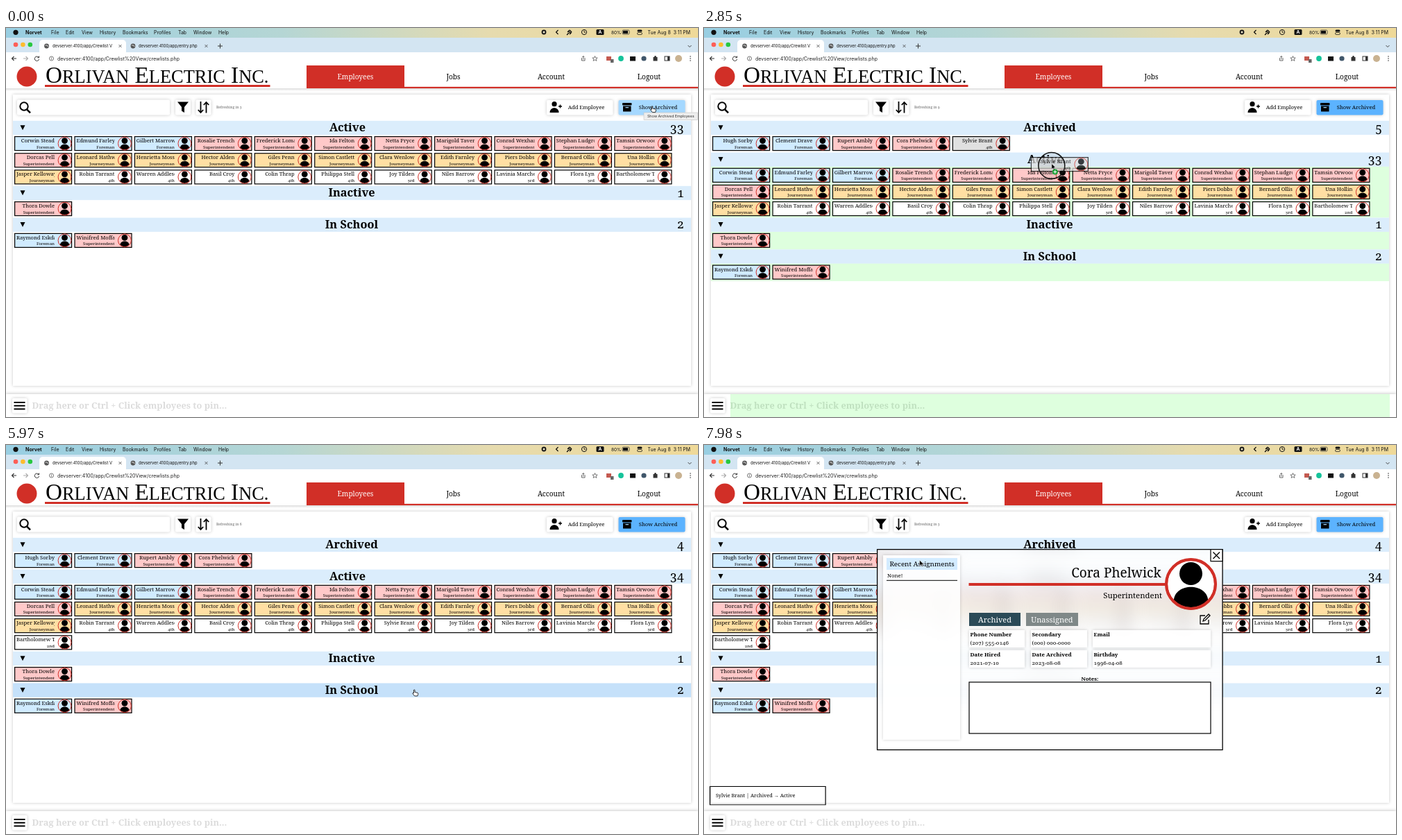
These frames come from a looping animation (997x561 px, 8 s). An HTML page:

```html
<!DOCTYPE html>
<html lang="en">
<head>
<meta charset="utf-8">
<title>Employees</title>
<style>
html, body { margin: 0; width: 100%; height: 100%; overflow: hidden; background: #fff; }
#stage { display: block; width: 100vw; height: 100vh; font-family: "Noto Serif", serif; font-variant-numeric: oldstyle-nums; }
.ui { font-family: Inter, "Open Sans", sans-serif; font-variant-numeric: lining-nums; }
.b { font-weight: 700; }
.m { text-anchor: middle; }
.e { text-anchor: end; }
.soft { filter: drop-shadow(0 0 2px rgba(0,0,0,.22)); }
</style>
</head>
<body>
<svg id="stage" viewBox="0 0 997 561" preserveAspectRatio="none"></svg>
<script>
const LOOP = 8000, RED = '#d12f27';
const stage = document.getElementById('stage');
const $ = id => document.getElementById(id);

// Markup helpers
const rect = (x, y, w, h, fill, more = '') => `<rect x="${x}" y="${y}" width="${w}" height="${h}" fill="${fill}" ${more}/>`;
const circle = (x, y, r, fill, more = '') => `<circle cx="${x}" cy="${y}" r="${r}" fill="${fill}" ${more}/>`;
const path = (d, fill, more = '') => `<path d="${d}" fill="${fill}" ${more}/>`;
const line = (d, w = 1, color = '#000') => path(d, 'none', `stroke="${color}" stroke-width="${w}"`);
const text = (x, y, size, str, cls = '', fill = '#000', more = '') =>
  `<text x="${x}" y="${y}" font-size="${size}" class="${cls}" fill="${fill}" ${more}>${str}</text>`;
const border = 'stroke="#000" stroke-width="1.2"';

// People, grouped by rank
const looks = {
  Foreman: ['#d0ebff', '#a5d8ff'],
  Superintendent: ['#ffc9c9', '#ffa8a8'],
  Journeyman: ['#ffdfa3', '#ffca75']
};
const plain = ['#fff', '#e0e0e0'];
const crew = (rank, names) => names.split(',').map(name => ({ name, rank }));
const mover = { name: 'Sylvie Brant', rank: '4th' };
const archived = [
  ...crew('Foreman', 'Hugh Sorby,Clement Drave'),
  ...crew('Superintendent', 'Rupert Ambly,Cora Phelwick')
];
const seniors = [
  ...crew('Foreman', 'Corwin Stead,Edmund Farley,Gilbert Marrow'),
  ...crew('Superintendent', 'Rosalie Trench,Frederick Lomas,Ida Felton,Netta Pryce,Marigold Tavering,Conrad Wexham,Stephan Ludgrove,Tamsin Orwood,Dorcas Pell'),
  ...crew('Journeyman', 'Leonard Hathwell,Henrietta Moss,Hector Alden,Giles Penn,Simon Castlett,Clara Wenlow,Edith Farnley,Piers Dobbs,Bernard Ollis,Una Hollin,Jasper Kelloway'),
  ...crew('4th', 'Robin Tarrant,Warren Addlesey,Basil Croy,Colin Thrap,Philippa Stell')
];
const juniors = [
  ...crew('3rd', 'Joy Tilden,Niles Barrow,Lavinia Marchend,Flora Lyn'),
  ...crew('2nd', 'Bartholomew Tandy')
];
const rest = [
  ['Inactive', crew('Superintendent', 'Thora Dowle')],
  ['In School', [...crew('Foreman', 'Raymond Eskdale'), ...crew('Superintendent', 'Winifred Moffat')]]
];
const active = ['Active', [...seniors, ...juniors]];
const scenes = [
  [active, ...rest],
  [['Archived', [...archived, mover]], active, ...rest],
  [['Archived', archived], ['Active', [...seniors, mover, ...juniors]], ...rest]
];

const pen = document.createElement('canvas').getContext('2d');
pen.font = '7.6px "Noto Serif", serif';

const avatar = (x, y, s) => `<g transform="translate(${x} ${y}) scale(${s})">
  ${circle(0, -4, 4.4, '#000')}${path('M-6.6 6.4C-6.2 -.6 6.2 -.6 6.6 6.4Q0 11.6 -6.6 6.4Z', '#000')}
  ${circle(0, 0, 9.4, 'none', `stroke="${RED}" stroke-width="1"`)}</g>`;

function card(x, y, { name, rank }, held) {
  const [base, over] = looks[rank] || plain;
  const long = pen.measureText(name).width > 55;
  return rect(x + .6, y + .6, 82, 20, held ? over : base, `${border} data-base="${base}" data-over="${over}" data-name="${name}"`) +
    `<svg x="${x + 3}" y="${y}" width="55" height="21" overflow="hidden">
    ${text(long ? 0 : 55, 9.2, 7.6, name, long ? '' : 'e')}${text(55, 17.6, 6.1, rank, 'e')}</svg>` +
    avatar(x + 72.5, y + 10.6, 1);
}

function scene(sections, index) {
  let y = 133.8, out = '';
  for (const [title, people] of sections) {
    const height = 21.6 + 24.15 * Math.ceil(people.length / 11);
    const mid = 498 - (people.length > 9 ? 6 : 0);
    if (title !== 'Archived') out += rect(10, y + 20, 977, height - 20, '#0f0', 'class="zone" opacity="0"');
    out += rect(10, y, 977, 20.3, '#dbedfc', 'data-base="#dbedfc" data-over="#c5e1fa"') +
      path(`M20.5 ${y + 6.5}h7l-3.5 7z`, '#000') +
      text(mid, y + 15.6, 16.3, title, 'b m') +
      text(977, y + 15.8, 17.5, people.length, 'e', '#000', 'font-weight="500"');
    people.forEach((p, i) => {
      out += card(12 + 86.43 * (i % 11), y + 22.2 + 24.15 * Math.floor(i / 11), p);
    });
    y += height;
  }
  return `<g id="scene${index}">${out}</g>`;
}

function browser() {
  const menus = [['File', 65], ['Edit', 86], ['View', 109], ['History', 135], ['Bookmarks', 168],
    ['Profiles', 213], ['Tab', 248], ['Window', 270], ['Help', 306]];
  const ui = (x, y, s, str, cls = '', fill = '#111') => text(x, y, s, str, 'ui ' + cls, fill);
  const globe = x => circle(x, 26, 3.4, '#555') + line(`M${x - 2} 25h3l1 2`, 1, '#ddd');
  const cross = x => line(`M${x - 2} 24l4 4m0-4l-4 4`, .8, '#444');
  return rect(0, 0, 997, 14, 'url(#sky)') + circle(14, 6.3, 3.6, '#111') +
    ui(28, 8.8, 7.1, 'Norvet', 'b') + menus.map(([s, x]) => ui(x, 8.8, 6.9, s)).join('') +
    circle(775, 6, 3.4, '#111') + rect(773.6, 4.6, 2.8, 2.8, '#e8e2c4') +
    line('M795.5 3l-3 3 3 3', 1.1) + line('M808 10l3-3m-1-3l4 4m-2-5l3 3m-3-3l-3 3m6 0l-3 3', 1.3) +
    circle(833, 6, 3.6, 'none', 'stroke="#111"') + line('M833 3.5v2.7h2', .8) +
    rect(850.5, 2, 11, 8, '#111', 'rx="1.5"') + ui(856, 8.4, 6.5, 'A', 'm b', '#fff') +
    ui(872, 8.6, 6.4, '80%') + rect(888, 3, 10, 6, 'none', 'rx="1.5" stroke="#333" stroke-width=".8"') +
    rect(889, 4, 7, 4, '#111') + rect(909.5, 2.5, 7, 3, '#111', 'rx="1.5"') +
    rect(909.5, 6.5, 7, 3, 'none', 'rx="1.5" stroke="#111" stroke-width=".7"') +
    ui(986, 8.8, 6.9, 'Tue Aug 8&#160; 3:11 PM', 'e') +
    rect(0, 14, 997, 22, '#d3e5f2') + rect(48, 17, 125, 22, '#fff', 'rx="5"') + rect(0, 35, 997, 19, '#fff') +
    ['#fe5f57', '#febc2e', '#28c840'].map((c, i) => circle(14 + 10.4 * i, 24, 3.3, c)).join('') +
    globe(58.5) + ui(67, 28.2, 5.9, 'devserver:4100/app/Crewlist V') + cross(164.5) +
    globe(183) + ui(191, 28.2, 5.9, 'devserver:4100/app/entry.php') + cross(288.5) +
    line('M305 26h7m-3.5-3.5v7', 1, '#333') + line('M982.5 25l2.5 2.5 2.5-2.5', 1, '#444') +
    line('M15 44h-6.5m3-3l-3 3 3 3', 1.1, '#333') + line('M25 44h6.5m-3-3l3 3-3 3', 1.1, '#aaa') +
    line('M47 42.3a3.2 3.2 0 1 0 .6 2.7M47.6 40.5v2.3h-2.3', 1, '#333') +
    circle(65.5, 44, 3, 'none', 'stroke="#555" stroke-width=".8"') + line('M65.5 43.5v2.2m0-3.6v.8', .8, '#555') +
    ui(74, 46.6, 7.1, 'devserver:4100/app/Crewlist%20View/crewlists.php', '', '#222') +
    line('M829.5 43v4h4.5v-4M831.8 45.5v-5m-1.5 1.5l1.5-1.5 1.5 1.5', .8, '#444') +
    path('M848.5 40.5l1 2.5 2.7.1-2.1 1.7.8 2.6-2.4-1.5-2.4 1.5.8-2.6-2.1-1.7 2.7-.1z', 'none', 'stroke="#444" stroke-width=".7"') +
    rect(865, 41, 7, 6, '#c45a50') + rect(871, 45, 4.5, 5, '#666') + circle(886, 44, 3.9, '#15c39a') +
    rect(899, 41, 8, 6.5, '#111') + circle(919, 44, 3.6, '#40566a') +
    rect(932.5, 42, 6, 5.5, '#333') + circle(935.5, 41.5, 1.5, '#333') +
    rect(949, 41, 7, 6, 'none', 'stroke="#333"') + rect(953, 41, 3, 6, '#333') +
    circle(969, 44, 5, '#c9b291') + [41, 44, 47].map(y => circle(986, y, .8, '#333')).join('');
}

function page() {
  const small = 'font-size="26.4"';
  const box = (x, y, w, h, id = '') => rect(x, y, w, h, '#fff', `rx="2" class="soft" ${id}`);
  return rect(0, 54, 997, 507, '#fff') + rect(0, 87, 997, 4, 'url(#fade)') +
    circle(30, 70, 14.5, RED) + rect(56, 82, 324.5, 3, RED) +
    `<text x="57" y="79.3" font-size="33.2" font-family="Liberation Serif, serif">O<tspan ${small}>RLIVAN</tspan> E<tspan ${small}>LECTRIC</tspan> I<tspan ${small}>NC.</tspan></text>` +
    rect(433, 54, 141, 33, RED) + rect(433, 84.8, 564, 2.2, RED) +
    ['Employees', 'Jobs', 'Account', 'Logout'].map((s, i) => text(503.5 + 141 * i, 73.8, 10.1, s, 'm', i ? '#000' : '#fff')).join('') +
    rect(10, 96, 977, 420, '#fff', 'class="soft"') +
    box(16, 103.5, 220, 22) + circle(26, 113, 5.7, 'none', 'stroke="#000" stroke-width="2"') + line('M30 117.3l5 5', 2.4) +
    box(244, 103.5, 22, 22) + path('M247 106.5h16l-6 7.5v8l-4-2.5v-5.5z', '#000') +
    box(273.5, 103.5, 22, 22) + line('M280.5 106v15M276.8 118l3.7 4 3.7-4M288.5 122.5v-15M284.8 111l3.7-4 3.7 4', 1.8) +
    text(303, 116.3, 5.1, '', '', '#666', 'id="refresh"') +
    box(779, 104, 95.5, 21.5) + circle(790, 109.7, 3.6, '#000') + path('M783.5 122c0-9 13-9 13 0z', '#000') +
    line('M796 113h5m-2.5-2.5v5', 1.4) + text(836, 117.3, 7.7, 'Add Employee', 'm') +
    box(882.5, 104, 96, 21.5, 'id="archive"') + rect(888, 108, 13.5, 3.5, '#000', 'rx="1"') +
    path('M889 112.5h11.5v8h-11.5z', '#000') + rect(892.5, 114, 4.5, 1.3, '#9cd0f8') +
    text(939.5, 117.3, 7.7, 'Show Archived', 'm');
}

const footer = () => rect(0, 528, 997, 33, '#fff', 'style="filter:drop-shadow(0 -1px 2px rgba(0,0,0,.2))"') +
  rect(9, 534, 21.5, 21.5, '#fff', 'rx="2" class="soft"') + line('M11.5 540h16m-16 4.7h16m-16 4.7h16', 2) +
  text(37.5, 549, 12.8, 'Drag here or Ctrl + Click employees to pin...', 'b', '#dcdcdc') +
  rect(38, 528, 950, 33, '#0f0', 'class="zone" opacity="0"');

// White sheet showing a blurred copy of the list beneath
const sheet = (id, x, y, w, h, content) => `<clipPath id="${id}Clip">${rect(x, y, w, h, '#000')}</clipPath>
  <g id="${id}">${rect(x, y, w, h, '#fff')}
  <g clip-path="url(#${id}Clip)"><use href="#list" filter="url(#blur)" opacity=".38"/></g>
  ${rect(x, y, w, h, 'none', 'stroke="#000" stroke-width="1.3"')}${content}</g>`;

function notice() {
  const notes = [
    'If you choose to remove the archive date, a new archive date will be assigned to this employee the next time they are', 'archived as if they were never archived.',
    'You can choose to keep the date if you are using the archive date as a way to know when an employee was fired, for', 'instance.',
    'Archive date is currently not being used anywhere else in the system, this is purely for if you want to keep track of', 'when they were archived.'
  ];
  const button = (x, s, fill) => rect(x, 345, 72, 16, fill, 'stroke="#222" stroke-width=".9"') + text(x + 36, 355.8, 7.65, s, 'm');
  return sheet('notice', 312, 221, 373, 149,
    text(320.5, 248, 19.3, 'Notice') + rect(321, 257.3, 106, 3.6, RED) +
    text(321, 273, 7.15, 'You are un-archiving an employee, do you want to remove the original archive date?') +
    rect(321, 279, 355, 61, '#f8fbfd', 'opacity=".8" stroke="#ccc" stroke-width=".7"') + line('M321 340h355', .9, '#888') +
    notes.map((s, i) => {
      const y = 289.3 + 19 * (i >> 1) + 7.8 * (i % 2);
      return text(332, y, 5.5, s, '', '#666') + (i % 2 ? '' : circle(326.5, y - 2, 1, '#666'));
    }).join('') +
    button(374, 'Cancel', '#fff') + button(462, 'Remove Date', '#fff') + button(551, 'Keep Date', '#b2fbb8'));
}

function profile() {
  const field = (x, y, w, label, value) => rect(x, y, w, 25, '#fff', 'class="soft" opacity=".9"') +
    text(x + 1.5, y + 9, 7.9, label, 'b') + text(x + 1.5, y + 21, 7.9, value);
  const badge = (x, w, s, fill) => rect(x, 242, w, 19, fill) + text(x + w / 2, 255.5, 11, s, 'm', '#fff');
  return sheet('profile', 249.6, 150.6, 497.5, 289,
    rect(258, 159, 111, 266, '#fff', 'class="soft" opacity=".85"') + rect(263, 163, 102, 17, '#d3ebff') +
    text(314, 175, 9.8, 'Recent Assignments', 'm') + text(264, 191, 7.8, 'None!') + line('M263 195.3h102') +
    rect(730, 150.6, 17, 17, '#fff', border) + line('M733.5 154.5l9.5 9.5m0-9.5l-9.5 9.5', 1.4) +
    text(658.5, 191, 19, 'Cora Phelwick', 'e') + text(660, 221, 11.4, 'Superintendent', 'e') +
    rect(381.5, 199, 286, 4, RED) + circle(701.5, 200.5, 35, '#fff') + avatar(701.5, 200.5, 3.75) +
    circle(701.5, 200.5, 35.5, 'none', `stroke="${RED}" stroke-width="4"`) +
    badge(382, 74, 'Archived', '#2b4a57') + badge(464, 75, 'Unassigned', '#7f8888') +
    line('M722 246h-7v12h12v-6M719 254l1-3 7-7 2 2-7 7z', 1.3) +
    field(382, 267, 80, 'Phone Number', '(207) 555-0146') + field(471, 267, 81, 'Secondary', '(000) 000-0000') +
    field(560, 267, 170, 'Email', '') + field(382, 296, 80, 'Date Hired', '2021-07-10') +
    field(471, 296, 81, 'Date Archived', '2023-08-08') + field(560, 296, 170, 'Birthday', '1996-04-08') +
    text(556, 339.5, 7.9, 'Notes:', 'b m') + rect(382, 342, 348, 74, '#fff', border));
}

stage.innerHTML = `<defs>
  <linearGradient id="sky"><stop stop-color="#98cee2"/><stop offset=".4" stop-color="#b5d6d4"/>
  <stop offset=".7" stop-color="#e6dbae"/><stop offset="1" stop-color="#efd998"/></linearGradient>
  <linearGradient id="fade" x2="0" y2="1"><stop stop-color="#ddd"/><stop offset="1" stop-color="#fff"/></linearGradient>
  <filter id="blur"><feGaussianBlur stdDeviation="12"/><feColorMatrix type="saturate" values=".65"/></filter></defs>
  ${page()}${browser()}<g id="list">${scenes.map(scene).join('')}</g>${footer()}
  <svg id="toast" x="8" width="168" overflow="hidden">${text(9, 16.5, 7.3, 'Sylvie Brant | Archived → Active')}
  <rect id="toastBox" x=".6" y=".6" width="166.5" fill="none" ${border}/></svg>
  ${notice()}${profile()}
  <g id="tip">${rect(919, 122, 77.5, 10.5, '#eee', 'stroke="#c4c4c4" stroke-width=".6"')}${text(957.7, 129.2, 5.4, 'Show Archived Employees', 'ui m', '#333')}</g>
  <g id="pointer">
    <g id="ghost" opacity=".75">${card(-30, -9.5, mover, true)}</g>
    ${circle(0, 3, 19, 'rgba(90,90,90,.1)', 'id="ring" stroke="#111" stroke-width="1.5"')}
    ${path('M0 0v8.2l2-1.7 1.3 2.9 1.4-.6-1.3-2.9h2.6z', '#000', 'id="arrow" stroke="#fff" stroke-width=".6"')}
    ${path('M-.8 0q.8-.8 1.6 0v3.2l4 .8q1 .4.6 2l-.8 2.6h-4.2l-2.9-3.6q0-1 1-.8l.7.5z', '#fff', 'id="hand" stroke="#000" stroke-width=".8"')}
    <g id="plus">${circle(5, 12, 4, '#1fa33a')}${line('M2.8 12h4.4m-2.2-2.2v4.4', 1.1, '#fff')}</g>
  </g>`;

const groups = scenes.map((_, i) => $('scene' + i));
const targets = groups.map(g => [...g.querySelectorAll('[data-base]')]);
const zones = document.querySelectorAll('.zone');
const show = (el, on) => el.setAttribute('display', on ? 'inline' : 'none');
const within = (t, a, b) => t >= a && t < b;
const clamp = v => Math.min(1, Math.max(0, v));
const ease = v => v * v * (3 - 2 * v);

// Pointer stops: time, x, y
const stops = [
  [0, 931, 113], [780, 931, 113], [1770, 486, 186], [2330, 388, 165.5], [2560, 388, 165.5],
  [3270, 696, 247.5], [4080, 637, 262], [4320, 637, 263], [4680, 597, 362], [5000, 590, 353],
  [5500, 589, 353], [6660, 587, 354], [7320, 343, 167], [7520, 343, 167], [7980, 310.5, 166], [8000, 310.5, 166]
];
function pointerAt(t) {
  const i = Math.max(1, stops.findIndex(s => s[0] > t));
  const [a, b] = [stops[i - 1], stops[i]];
  const k = ease(clamp((t - a[0]) / (b[0] - a[0])));
  return [a[1] + (b[1] - a[1]) * k, a[2] + (b[2] - a[2]) * k];
}
const inside = (x, y, l, t, w, h) => x >= l && x <= l + w && y >= t && y <= t + h;

function draw(t) {
  const [x, y] = pointerAt(t);
  const now = t < 700 ? 0 : t < 5600 ? 1 : 2;
  const dragging = within(t, 2500, 4320);
  const asking = within(t, 4350, 5400);
  const open = t >= 7620;
  const blocked = dragging || asking || open;
  let hot = asking ? inside(x, y, 551, 345, 72, 16) : !blocked && inside(x, y, 882, 104, 96, 21.5);

  groups.forEach((g, i) => show(g, i === now));
  for (const el of targets[now]) {
    const d = el.dataset, n = k => +el.getAttribute(k);
    const over = !blocked && inside(x, y, n('x'), n('y'), n('width'), n('height'));
    const held = dragging && d.name === mover.name;
    el.setAttribute('fill', over || held ? d.over : d.base);
    hot = hot || over;
  }
  zones.forEach(z => z.setAttribute('opacity', dragging ? .13 : 0));

  $('refresh').textContent = 'Refreshing in ' + (t < 700 ? 3 : 10 - Math.max(0, Math.floor((t - 1580) / 880)));
  $('archive').setAttribute('fill', t < 480 ? '#a5d8ff' : '#5cb3ff');
  show($('tip'), t < 900);
  show($('notice'), asking);
  show($('profile'), open);

  const height = 1.8 + 26 * (1 - (1 - clamp((t - 6650) / 400)) ** 3);
  show($('toast'), t >= 6650);
  $('toast').setAttribute('y', 519.6 - height);
  $('toast').setAttribute('height', height);
  $('toastBox').setAttribute('height', Math.max(.6, height - 1.2));

  $('pointer').setAttribute('transform', `translate(${x} ${y})`);
  show($('ghost'), dragging);
  show($('plus'), dragging);
  show($('ring'), within(t, 2440, 4320) || within(t, 440, 560) || within(t, 5280, 5400) || within(t, 7450, 7570));
  show($('hand'), hot);
  show($('arrow'), !hot);
}

const start = performance.now();
function frame() {
  draw((performance.now() - start) % LOOP);
  requestAnimationFrame(frame);
}
frame();
</script>
</body>
</html>
```
